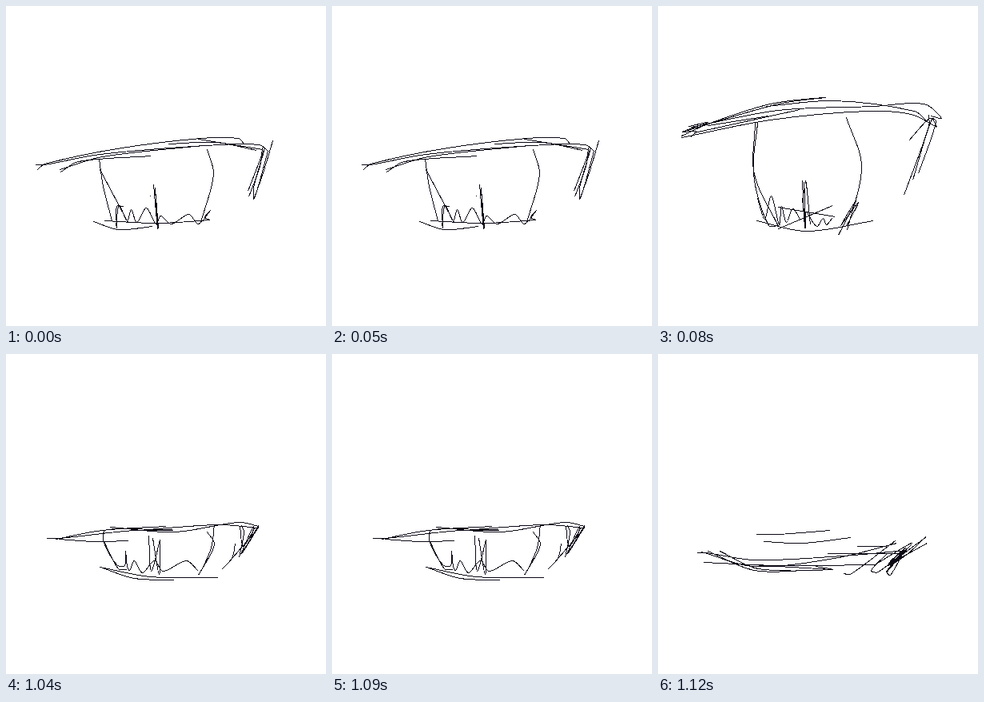
Animation of 400 by 400 pixels, one loop 1200 ms. Source, as an HTML page:

```html
<!DOCTYPE html>
<html lang="en">
<head>
<meta charset="utf-8">
<title>Blinking eye sketch</title>
<style>
  html, body { margin: 0; width: 100%; height: 100%; overflow: hidden; background: #fff; }
  svg { display: block; width: 400px; height: 400px; }
  path { fill: none; stroke: #0c0816; stroke-width: 1; shape-rendering: crispEdges; }
</style>
</head>
<body>
<svg viewBox="0 0 400 400"><path id="ink" transform="translate(.5 .5)"/></svg>
<script>
let d = "";

// One pen stroke: a Catmull-Rom spline through x,y pairs.
function pen(...xy) {
  const n = xy.length / 2;
  const at = i => {
    const k = 2 * Math.max(0, Math.min(n - 1, i));
    return [xy[k], xy[k + 1]];
  };
  d += "M" + at(0);
  for (let i = 0; i < n - 1; i++) {
    const [a, b, c, e] = [at(i - 1), at(i), at(i + 1), at(i + 2)];
    // Handles follow the segment's own length, so uneven points do not overshoot.
    const len = (p, q) => Math.hypot(q[0] - p[0], q[1] - p[1]);
    const s = len(b, c) / 3;
    const c1 = b.map((v, k) => v + (c[k] - a[k]) * s / (len(a, b) + len(b, c)));
    const c2 = c.map((v, k) => v - (e[k] - b[k]) * s / (len(b, c) + len(c, e)));
    d += `C${c1} ${c2} ${c}`;
  }
}

// Dense back-and-forth scribble around a centre.
function scribble(x, y, turns) {
  const xy = [];
  for (let i = 0; i < turns; i++) {
    const side = i % 2 ? -1 : 1, reach = 13 - i * 0.7;
    xy.push(x + side * reach, y - side * reach * 0.9 + 5 * Math.sin(i * 2));
  }
  pen(...xy);
}

function half() {
  // lid
  pen(36,198, 48,198, 117,185, 250,174, 316,173, 328,182);
  pen(39,204, 48,197, 138,178, 243,165, 290,165, 297,172);
  pen(68,207, 90,194, 181,187);
  pen(67,204, 120,188, 245,174);
  pen(203,172, 262,170, 313,180);
  pen(240,166, 321,179);
  // lashes
  pen(333,168, 321,208, 309,242);
  pen(320,177, 317,200, 303,238);
  pen(322,179, 302,231);
  pen(327,181, 310,240, 309,227, 322,181);
  // iris
  pen(116,191, 121,225, 132,268);
  pen(117,204, 152,270);
  pen(251,179, 259,210, 243,270);
  pen(184,223, 189,278, 186,227, 190,278);
  pen(179,237, 180,237);
  // base
  pen(109,269, 140,279, 183,275);
  pen(123,268, 190,271, 255,267);
  pen(138,277, 138,250, 146,250);
  pen(137,275, 141,249, 151,268, 156,254, 163,270, 175,252, 187,272, 193,262,
      206,272, 228,260, 240,272, 255,255, 248,264, 255,267);
}

function open() {
  // lid
  pen(29,162, 62,147, 140,122, 209,114, 150,122, 33,156);
  pen(29,164, 140,142, 260,131, 316,135, 348,151);
  pen(41,151, 150,130, 270,125);
  pen(270,125, 332,122, 354,140, 341,137);
  pen(135,125, 220,118, 320,131, 337,145);
  pen(45,158, 177,129);
  pen(62,149, 138,137);
  pen(38,150, 62,145, 30,157, 47,156, 40,164);
  // lashes
  pen(348,151, 342,141, 318,217);
  pen(338,135, 338,150, 307,236);
  pen(313,168, 339,140, 347,144, 325,209);
  // iris
  pen(124,146, 119,210, 138,274, 153,273);
  pen(121,146, 120,210, 150,275);
  pen(235,139, 254,200, 236,280);
  pen(180,218, 183,277, 184,218, 190,273);
  pen(180,240, 184,277, 182,220);
  // base
  pen(123,268, 185,281, 269,268);
  pen(124,240, 133,266, 141,237, 151,272, 154,250, 160,270, 168,253, 178,268);
  pen(150,278, 218,249);
  pen(150,251, 221,263);
  pen(186,258, 198,275, 206,265, 210,273, 217,265);
  pen(225,286, 247,243, 228,274, 250,245, 235,275);
}

function nearlyShut() {
  // lid
  pen(50,230, 66,230, 160,220, 208,220);
  pen(62,231, 120,220, 200,215);
  pen(66,231, 110,234, 153,233);
  pen(130,216, 210,222, 290,210, 316,215);
  pen(132,218, 208,219);
  pen(165,220, 265,213, 315,217);
  // lashes
  pen(315,214, 302,236, 291,252);
  pen(294,214, 297,222, 291,254);
  pen(315,216, 294,249, 309,215, 305,234);
  pen(292,215, 296,240, 310,218);
  pen(286,237, 282,255, 269,269);
  pen(315,217, 277,261);
  // iris
  pen(122,220, 121,233, 138,263, 148,264, 149,246, 151,265, 154,270, 160,258,
      170,273, 185,258, 196,271, 225,258, 240,271);
  pen(122,234, 140,268, 151,269);
  pen(178,227, 181,271, 192,232);
  pen(192,232, 191,275, 183,230);
  pen(251,222, 260,238, 240,276);
  pen(260,213, 256,242, 243,272);
  // base
  pen(117,266, 180,278, 265,279);
  pen(120,267, 160,280, 210,282);
}

function shut() {
  // lid
  pen(122,225, 150,225, 215,220);
  pen(132,234, 180,236, 241,229);
  // base
  pen(48,248, 60,248, 120,257, 230,252, 310,245);
  pen(57,260, 150,264, 271,263);
  pen(54,247, 120,265, 220,255, 298,236);
  pen(62,246, 120,270, 188,270);
  pen(77,246, 125,268, 217,269, 197,265);
  pen(100,262, 217,269);
  pen(248,240, 285,240);
  pen(211,249, 300,249);
  // lashes
  pen(232,274, 240,275, 296,233, 290,238);
  pen(285,250, 266,270, 275,272, 317,236, 272,262);
  pen(335,228, 285,265);
  pen(335,227, 312,249, 290,264);
  pen(336,236, 289,262);
  pen(310,243, 286,272, 290,276, 306,248);
  scribble(297, 256, 12);
}

function sketch(pose) {
  d = "";
  pose();
  return d;
}

const scenes = [[80, half], [1040, open], [1120, nearlyShut], [1200, shut]]
  .map(([end, pose]) => ({ end, d: sketch(pose) }));
const ink = document.getElementById("ink");
const start = performance.now();

function draw() {
  const t = (performance.now() - start) % 1200;
  ink.setAttribute("d", scenes.find(scene => t < scene.end).d);
  requestAnimationFrame(draw);
}
draw();
</script>
</body>
</html>
```
